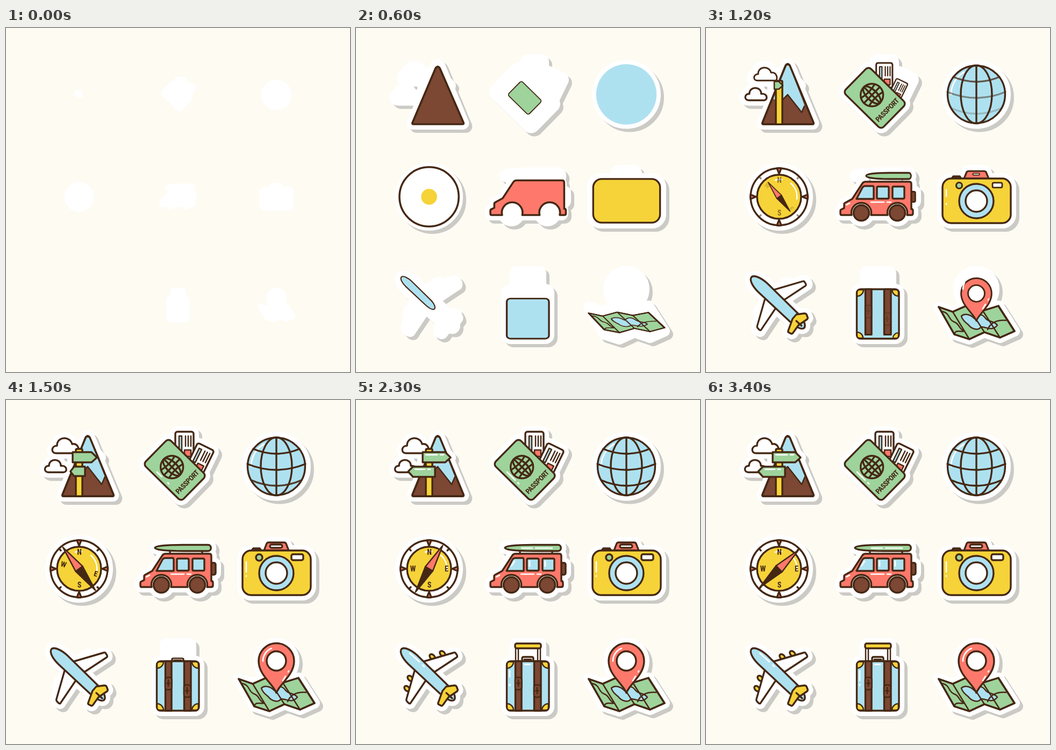
Animation of 640 by 640 pixels, one loop 3600 ms. Source, as an HTML page:

```html
<!DOCTYPE html>
<html lang="en">
<head>
<meta charset="utf-8">
<title>Travel stickers</title>
<style>
html,body{margin:0;width:100%;height:100%;overflow:hidden;background:#fefbf3}
svg{display:block;width:100vw;height:100vh}
#stickers{fill:#fff;stroke:#fff;stroke-width:20;stroke-linejoin:round}
#icons{fill:none;stroke:#452814;stroke-width:3.4;stroke-linejoin:round;stroke-linecap:round}
.w{fill:#fff}
.r{fill:#fe796b}
.g{fill:#9ed39c}
.b{fill:#aee1f0}
.y{fill:#f6d338}
.m{fill:#7c4733}
.k{fill:#452814}
.hi{stroke:#fff;stroke-width:2.6}
.n{stroke:none}
text{fill:#452814;stroke:none;text-anchor:middle;font:600 14px "Roboto Condensed","Open Sans Condensed","Open Sans",sans-serif;font-stretch:condensed}
.title{font-size:13.5px;letter-spacing:-.5px}
</style>
</head>
<body>
<svg viewBox="0 0 640 640">
<defs>
  <path id="peak" d="M148 70Q152 64 156 70L200 176Q201 179 198 179H107Q104 179 105 176Z"/>
  <path id="cloudA" d="M128 99H93C83 99 84 85 95 85C94 68 119 66 123 82C133 80 138 91 134 99Z"/>
  <path id="cloudB" d="M79 134.500C70 134.500 70 122 80 122.500C80 108 102 108 102 122.500C114 121 115 134.500 107 134.500Z"/>
  <path id="signA" d="M124 97H166L176 107L166 116H124Z"/>
  <rect id="cover" x="-33.500" y="-49.500" width="67" height="99" rx="7" transform="translate(314 130) rotate(-45.500)"/>
  <rect id="stub" x="-17" y="0" width="34" height="52" rx="4"/>
  <path id="van" d="M252 348Q250 348 250 345V340Q250 338 253 337L257 335V327Q258 325 261 324L272 318L291 289Q293 286 297 286H378Q382 286 382 290V337H384Q385 338 385 340V345Q385 348 382 348H374A18.500 18.500 0 1 0 338 348H307A18.500 18.500 0 1 0 271 348Z"/>
  <path id="board" d="M277 275C277 271 300 269.500 330 269.500H376C383 269.500 383 281 376 281H330C300 281 277 279 277 275Z"/>
  <rect id="spare" x="380" y="303" width="10" height="22" rx="3"/>
  <rect id="camera" x="440" y="280" width="127" height="83" rx="16"/>
  <path id="hump" d="M480 280L485 267Q486 265 488 265H517Q520 265 521 267L526 280Z"/>
  <path id="hull" d="M85 463C91 459 104 466 114 475L172 532C184 544 187 556 181 559C175 561 165 554 156 546L97 491C86 480 80 468 85 463Z"/>
  <path id="wingA" d="M124 487L182 470Q185 469 186 472L188 475Q189 478 187 479L146 506Z"/>
  <path id="wingB" d="M110 500L94 556Q93 559 95 561L98 564Q101 566 102 563L131 520Z"/>
  <path id="fin" d="M161 541L153 563Q152 566 155 567L159 569Q161 569 162 567L172 553L188 542Q190 540 189 538L187 533Q186 531 183 531L168 533Z"/>
  <rect id="case" x="280.500" y="486" width="78.500" height="92" rx="7"/>
  <path id="map" d="M433 519L459 528L486 516L515 526L544 517L574 564L547 576L518 566L490 579L462 570Z"/>
  <path id="pin" d="M503 545C497 528 470 512 470 485.500A33 33 0 0 1 536 485.500C536 512 509 528 503 545Z"/>
  <path id="tick" d="M132 261Q136 260 140 261L136 271Z"/>
  <g id="ticket">
    <use href="#stub" class="w"/>
    <path class="b" stroke-width="2.500" d="M-10 8h5v27h-5z"/>
    <path stroke-width="2.500" d="M2 8V27M7 8V27M12 8V27"/>
    <path class="r" stroke-width="2.500" d="M0 34H12V46H0Z"/>
  </g>
</defs>

<g id="stickers">
  <g data-a="s 280 600 135 122"><use href="#peak"/><use href="#cloudA"/><use href="#cloudB"/><use href="#signA"/></g>
  <g data-a="s 200 600 320 123"><use href="#cover"/><use href="#stub" x="332" y="59"/><use href="#stub" transform="translate(372 87) rotate(26)"/></g>
  <g data-a="s 200 600 503 125"><circle cx="503" cy="123.500" r="54"/></g>
  <g data-a="s 200 600 136 315"><circle cx="136" cy="314" r="53"/></g>
  <g data-a="s 200 600 320 313"><use href="#van"/><use href="#board"/><use href="#spare"/><circle cx="289" cy="344" r="15"/><circle cx="356" cy="344" r="15"/></g>
  <g data-a="s 200 600 503 314"><use href="#camera"/><use href="#hump"/></g>
  <g data-a="s 300 600 140 515"><use href="#hull"/><use href="#wingA"/><use href="#wingB"/><use href="#fin"/><path d="M141 477L160 472M95 538L101 519"/></g>
  <g data-a="s 200 600 320 516"><use href="#case"/><rect x="296" y="453" width="48" height="40" rx="3"/></g>
  <g data-a="s 200 600 503 515"><use href="#map"/><use href="#pin"/></g>
</g>

<g id="icons">
  <!-- mountain -->
  <use href="#cloudA" class="w" data-a="s 950 1350 110 90"/>
  <use href="#peak" class="m" data-a="y 300 680 152 179"/>
  <path class="b n" data-a="y 600 900 152 68;p 900 1350" data-from="M151 69L143 108L146 136L152 125L169 156L174 140L155 69Z" d="M150 70L123 135L139 137L152 124L178 157L184 143L155 70Z"/>
  <path data-a="d 850 1300" stroke-width="2.500" d="M143 133L152 124L178 157L184 143"/>
  <use href="#peak" data-a="y 300 680 152 179"/>
  <use href="#cloudB" class="w" data-a="s 650 850 92 125;m 850 1450 4 0"/>
  <path class="y" data-a="y 950 1300 136 179" d="M130 179V93Q130 91 132 91H140Q142 91 142 93V179Z"/>
  <path class="g" data-a="s 1100 1300 136 107;p 1170 1770" data-from="M124 97H132L142 107L132 116H124Z" d="M124 97H166L176 107L166 116H124Z"/>
  <path class="g" data-a="s 1250 1450 136 133;p 1450 1800" data-from="M147 124H134L128 133L134 141H147Z" d="M147 124H106L97 133L106 143H147Z"/>
  <path class="hi" data-a="d 1500 1900" d="M130 102H151M157 102H163M110 129H128M134 129H138"/>

  <!-- passport -->
  <g data-a="s 900 1350 330 112"><use href="#ticket" x="332" y="59"/></g>
  <g data-a="s 1000 1450 350 125"><use href="#ticket" transform="translate(372 87) rotate(26)"/></g>
  <g data-a="s 500 810 314 130"><use href="#cover" class="g"/></g>
  <g transform="translate(314 130) rotate(-45.500)">
    <g data-a="b 600 950 0 -7.500">
      <circle cy="-7.500" r="21"/><ellipse cy="-7.500" rx="9.500" ry="21"/>
      <path d="M0 -28.500V13.500M-21 -7.500H21M-18 -18Q0 -13 18 -18M-18 3Q0 -2 18 3"/>
    </g>
    <g data-a="b 650 1000 0 32"><text class="title" y="37">PASSPORT</text></g>
  </g>
  <path class="hi" data-a="d 1350 1850" d="M281 134L296 149M301 154L303 156"/>

  <!-- globe -->
  <g data-a="b 300 700 503 123.500"><circle class="b n" cx="503" cy="123.500" r="54"/></g>
  <path class="hi" data-a="d 700 1000" d="M456 124A48 48 0 0 1 480 82"/>
  <g data-a="o 760 1080"><path d="M503 70V177"/><ellipse cx="503" cy="123.500" rx="29" ry="54"/></g>
  <path data-a="o 900 1300" d="M460 91Q503 109 546 91"/>
  <path data-a="o 1000 1400" d="M449 119Q503 141 557 119"/>
  <path data-a="o 1100 1550" d="M456 149Q503 170 550 149"/>
  <circle data-a="o 600 960" cx="503" cy="123.500" r="53.500"/>

  <!-- compass -->
  <g data-a="b 300 700 136 314"><circle class="w" cx="136" cy="314" r="53"/></g>
  <g data-a="s 540 840 136 314"><circle class="y n" cx="136" cy="314" r="41"/></g>
  <circle data-a="o 650 850" cx="136" cy="314" r="41"/>
  <path class="hi" data-a="d 700 900" d="M158 289A33.500 33.500 0 0 1 169 318M129 283Q135 281 141 282"/>
  <g class="r" data-a="o 700 900"><use href="#tick"/><use href="#tick" transform="rotate(180 136 314)"/></g>
  <g class="r" data-a="o 950 1200"><use href="#tick" transform="rotate(90 136 314)"/><use href="#tick" transform="rotate(270 136 314)"/></g>
  <path data-a="o 1050 1350" d="M99 277L102 280M173 277L170 280M99 351L102 348M173 351L170 348"/>
  <g data-a="o 1050 1300"><text x="136.500" y="288">N</text><text x="136.500" y="349">S</text></g>
  <g data-a="o 1150 1400;r 1300 1800 136 314 45"><text x="106" y="319">W</text><text x="168.500" y="319">E</text></g>
  <g data-a="s 1050 1400 136 314"><g id="needle" stroke-width="2.500"><path class="k" d="M-8 0L0 50L8 0Z"/><path class="r" d="M-8 0L0 -50L8 0Z"/></g></g>

  <!-- van -->
  <g data-a="s 950 1350 385 314"><use href="#spare" class="m"/></g>
  <path data-a="o 1100 1400" d="M305 282V285M365 282V285"/>
  <use href="#board" class="g" data-a="x 950 1400 382 275"/>
  <path class="hi" data-a="d 1500 1900" d="M308 275.500H328M334 275.500H365"/>
  <use href="#van" class="r" data-a="b 300 700 250 348"/>
  <g class="b">
    <path data-a="s 600 850 300 306" d="M280 318L291 297Q293 294 296 294H310Q312 294 312 297V318Z"/>
    <rect data-a="s 650 900 329 306" x="318" y="295" width="22" height="22.500" rx="2"/>
    <rect data-a="s 900 1200 358 306" x="347" y="295" width="22" height="22.500" rx="2"/>
  </g>
  <g class="m">
    <circle data-a="s 600 850 289 344" cx="289" cy="344" r="14.500"/>
    <circle data-a="s 650 900 356 344" cx="356" cy="344" r="14.500"/>
  </g>
  <path class="hi" data-a="d 1050 1400" d="M307 324H331M337 324H344M261 329L267 326"/>
  <path class="hi" data-a="d 1500 1900" d="M289 309L295 300M323 300V309M352 300V309"/>

  <!-- camera -->
  <path class="m" data-a="y 700 900 465 280" d="M457 280L460 276H472L475 280Z"/>
  <use href="#hump" class="r" data-a="y 950 1300 503 280"/>
  <rect class="w" data-a="s 1100 1400 503 272" x="491" y="269" width="23" height="6" rx="3"/>
  <use href="#camera" class="y" data-a="s 300 650 503 322"/>
  <g data-a="b 600 1000 503 322"><circle class="b" cx="503" cy="322" r="32"/></g>
  <g data-a="s 700 920 503 322"><circle class="w" cx="503" cy="322" r="20"/></g>
  <circle class="g" data-a="s 950 1300 471 293" cx="471" cy="293" r="6"/>
  <rect class="w" data-a="s 1000 1350 542 292;k 1900 200 542 292" x="531" y="287" width="22" height="11" rx="3"/>
  <path class="hi" data-a="d 1050 1450" d="M447 301V320M447 327V328"/>
  <path class="hi" data-a="v 2700 250" d="M543 331V343M561 312L566 322"/>

  <!-- plane -->
  <g class="y" data-a="s 1400 1750 130 510">
    <ellipse rx="6" ry="4" transform="translate(142 478) rotate(45)"/>
    <ellipse rx="6" ry="4" transform="translate(161 472) rotate(45)"/>
    <ellipse rx="6" ry="4" transform="translate(95 537) rotate(45)"/>
    <ellipse rx="6" ry="4" transform="translate(101 518) rotate(45)"/>
  </g>
  <g class="w" data-a="s 800 1300 130 502"><use href="#wingA"/><use href="#wingB"/></g>
  <use href="#hull" class="b" data-a="s 500 756 84 463"/>
  <use href="#fin" class="y" data-a="s 650 900 168 540"/>
  <path data-a="d 1000 1300" d="M168 545L179 555"/>
  <path class="hi" data-a="d 1500 1900" d="M100 471L118 487M124 493L127 496"/>

  <!-- suitcase -->
  <path class="w" stroke-width="2.500" data-a="y 1600 1900 319 486" d="M297 486V459H302V486ZM338 486V459H343V486Z"/>
  <rect class="y" data-a="x 1950 2300 320 458" x="296" y="453" width="48" height="9" rx="3"/>
  <path data-a="y 1300 1750 320 486" d="M309 486V481Q309 478 312 478H327Q330 478 330 481V486M313 483H326"/>
  <use href="#case" class="b" data-a="y 400 754 320 578"/>
  <g class="m" data-a="y 950 1300 320 486"><path d="M296.500 486H308V578H296.500ZM331.500 486H344V578H331.500Z"/></g>
  <g class="y" stroke-width="2.500">
    <path data-a="s 800 1150 281 487" d="M281 499A12 12 0 0 0 293 487H286Q281 487 281 492Z"/>
    <path data-a="s 920 1250 358 487" d="M358 499A12 12 0 0 1 346 487H353Q358 487 358 492Z"/>
    <path data-a="s 920 1300 281 577" d="M281 565A12 12 0 0 1 293 577H286Q281 577 281 572Z"/>
    <path data-a="s 980 1350 358 577" d="M358 565A12 12 0 0 0 346 577H353Q358 577 358 572Z"/>
  </g>
  <g class="m" stroke-width="2.500" data-a="o 1100 1400">
    <rect x="296" y="516" width="12.500" height="23" rx="5"/><rect x="331" y="530" width="12.500" height="23" rx="5"/>
    <path d="M302 521V532M299 527H305M337 535V546M334 541H340"/>
  </g>
  <path class="hi" data-a="d 2200 2700" d="M286 504V522M286 529V531M314 492H324"/>

  <!-- map and pin -->
  <g data-a="y 500 770 503 548">
    <use href="#map" class="g"/>
    <path class="b" stroke-width="2.500" d="M475 536C482 530 492 533 500 541C506 530 514 532 520 540C526 548 536 544 542 553C532 565 522 556 512 556C506 564 494 560 488 552C482 547 477 543 475 536Z"/>
    <path stroke-width="2.500" d="M459 528L490 579M486 516L518 566M515 526L547 576M438 527C455 530 450 543 462 547C472 550 470 561 481 564M462 570C464 560 474 566 481 564M524 561C530 547 543 543 558 544"/>
    <use href="#map"/>
  </g>
  <g data-a="s 950 1350 503 545">
    <use href="#pin" class="r"/><circle class="w" cx="503" cy="485.500" r="18"/>
  </g>
  <path class="hi" data-a="d 1150 1450" d="M478 486A25.500 25.500 0 0 1 494 462M520 514L515 522M525 506L526 504"/>
</g>
</svg>
<script>
const LOOP = 3600, STEP = 100, HOLD = 400;
const ramp = (t, a, b) => Math.min(1, Math.max(0, (t - a) / (b - a)));
const out = p => 1 - (1 - p) ** 2;
const back = p => 1 + 2.2 * (p - 1) ** 3 + 1.2 * (p - 1) ** 2;
const smooth = p => p * p * (3 - 2 * p);
const numbers = /-?\d+(\.\d+)?/g;

const parts = [...document.querySelectorAll('[data-a]')].map(el => ({
  el,
  from: (el.dataset.from || '').match(numbers),
  shape: el.getAttribute('d'),
  moves: el.dataset.a.split(';').map(s => {
    const [kind, ...v] = s.split(' ');
    if (kind === 'd') {
      el.setAttribute('pathLength', 1);
      el.style.strokeDasharray = '1 2';
    }
    return { kind, v: v.map(Number) };
  })
}));

const scaleAt = (x, y, sx, sy) => `translate(${x} ${y}) scale(${sx} ${sy}) translate(${-x} ${-y})`;

function pose({ el, from, shape, moves }, t) {
  let transform = '', alpha = 1;
  for (const { kind, v: [a, b, x, y, turn] } of moves) {
    const p = ramp(t, a, b), e = kind === 'b' ? back(p) : out(p);
    if ('sbxy'.includes(kind)) {
      if (p === 0) alpha = 0;
      transform += scaleAt(x, y, kind === 'y' ? 1 : e, kind === 'x' ? 1 : e);
    } else if (kind === 'm') {
      transform += `translate(${x * (1 - e)} ${y * (1 - e)})`;
    } else if (kind === 'r') {
      transform += `rotate(${turn * (1 - e)} ${x} ${y})`;
    } else if (kind === 'o') {
      alpha *= p;
    } else if (kind === 'v') {
      alpha *= 1 - Math.min(1, Math.abs(t - a) / b);
    } else if (kind === 'k') {
      transform += scaleAt(x, y, 1, Math.max(.02, Math.min(1, Math.abs(t - a) / b)));
    } else if (kind === 'd') {
      if (p === 0) alpha = 0;
      el.style.strokeDashoffset = 1 - e;
    } else if (kind === 'p') {
      let i = 0;
      el.setAttribute('d', shape.replace(numbers, n => {
        const start = +from[i++];
        return start + (n - start) * e;
      }));
    }
  }
  if (transform) el.setAttribute('transform', transform);
  el.style.opacity = alpha;
  el.style.visibility = alpha > 0 ? 'visible' : 'hidden';
}

function needleAngle(t) {
  const swing = -37 - 3 * ramp(t, 1500, 1900) + 86 * smooth(ramp(t, 1900, 2450));
  const p = ramp(t, 2700, 3400);
  return swing + 6 * Math.sin(p * Math.PI * 2) * (1 - p);
}

const stickers = document.getElementById('stickers');
const needle = document.getElementById('needle');

function draw() {
  const ms = performance.now() % LOOP;
  const t = ms < HOLD ? HOLD - STEP : Math.floor(ms / STEP) * STEP;
  const drop = 6 * out(ramp(t, 300, 600));
  stickers.style.filter = drop ? `drop-shadow(${drop}px ${drop}px 0 #cbcac5)` : 'none';
  for (const part of parts) pose(part, t);
  needle.setAttribute('transform', `translate(136 314) rotate(${needleAngle(t)})`);
  requestAnimationFrame(draw);
}
draw();
</script>
</body>
</html>
```
